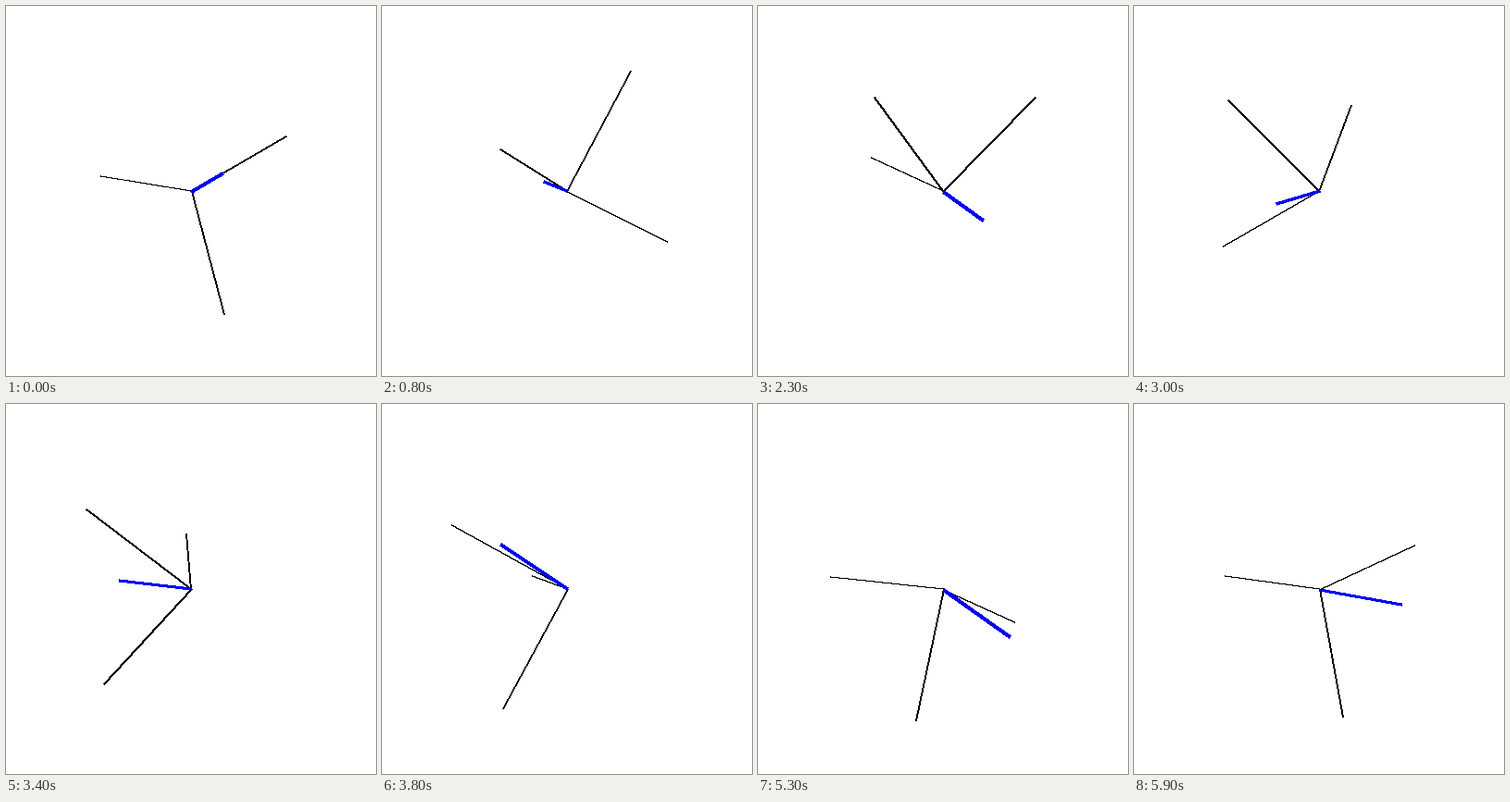
Write an HTML page with a canvas that moves like this. It is 400 px wide and 400 px high and loops after 6 s.

```html
<!DOCTYPE html>
<html lang="en">
<head>
<meta charset="utf-8">
<title>Precessing axes</title>
<style>
  html, body { margin: 0; width: 100%; height: 100%; overflow: hidden; background: #fff; }
  canvas { display: block; width: 400px; height: 400px; }
</style>
</head>
<body>
<canvas id="stage" width="400" height="400"></canvas>
<script>
const ctx = document.getElementById("stage").getContext("2d");
const CENTER = 200, AXIS = 120, STEPS = 60, STEP_MS = 100;
const rad = deg => deg * Math.PI / 180;
const TILT = rad(20), ISO = rad(30);

// Rounding that sends halves away from zero or towards it
const roundUp = v => Math.sign(v) * Math.floor(Math.abs(v) + 0.5);
const roundDown = v => Math.sign(v) * Math.ceil(Math.abs(v) - 0.5);

// Isometric projection to whole pixels
function project([x, y, z]) {
  return [
    Math.floor(CENTER + (x - y) * Math.cos(ISO)),
    Math.floor(CENTER + (x + y) * Math.sin(ISO) - z)
  ];
}

// Hard-edged fill of a convex polygon, row by row
function fillPolygon(points) {
  const rows = points.map(p => p[1]);
  const bottom = Math.max(...rows);
  for (let y = Math.min(...rows); y <= bottom; y++) {
    const hits = [];
    points.forEach(([x0, y0], i) => {
      const [x1, y1] = points[(i + 1) % points.length];
      if (y < Math.min(y0, y1) || y > Math.max(y0, y1)) return;
      if (y0 === y1) hits.push(x0, x1);
      else hits.push(x0 + (y - y0) * (x1 - x0) / (y1 - y0));
    });
    const left = roundUp(Math.min(...hits));
    const right = roundDown(Math.max(...hits));
    if (right >= left) ctx.fillRect(left, y, right - left + 1, 1);
  }
}

// Line from the centre to a point in space
function drawVector(v, width, color) {
  const [x, y] = project(v);
  const dx = x - CENTER, dy = y - CENTER;
  const length = Math.hypot(dx, dy);
  if (!length) return;
  const half = (width - 1) / 2;
  const wide = roundUp(half) / length, slim = roundDown(half) / length;
  const xMin = roundDown(slim * dy), xMax = roundDown(wide * dy);
  const yMin = roundUp(slim * dx), yMax = roundUp(wide * dx);
  ctx.fillStyle = color;
  fillPolygon([
    [CENTER - xMin, CENTER + yMax],
    [x - xMin, y + yMax],
    [x + xMax, y - yMin],
    [CENTER + xMax, CENTER - yMin]
  ]);
}

function draw(step) {
  const turn = rad(360 * step / STEPS), spin = 2 * turn;
  const s = Math.sin(turn), c = Math.cos(turn);
  const st = Math.sin(TILT), ct = Math.cos(TILT);

  // Tilted frame turning about the x axis
  const a = [-ct, -st * s, -st * c];
  const b = [0, -c, s];
  const d = [st, -ct * s, -ct * c];

  // Widening, rising spiral inside that frame
  const rise = 40 * step / STEPS, radius = 40 + rise;
  const p = radius * Math.sin(spin), q = radius * Math.cos(spin);
  const tip = a.map((v, i) => p * v + q * b[i] + rise * d[i]);

  ctx.fillStyle = "#fff";
  ctx.fillRect(0, 0, 400, 400);
  for (const axis of [a, b, d]) drawVector(axis.map(v => v * AXIS), 2, "#000");
  drawVector(tip, 4, "#00f");
}

function tick() {
  draw(Math.floor(performance.now() / STEP_MS) % STEPS);
  requestAnimationFrame(tick);
}
tick();
</script>
</body>
</html>
```
